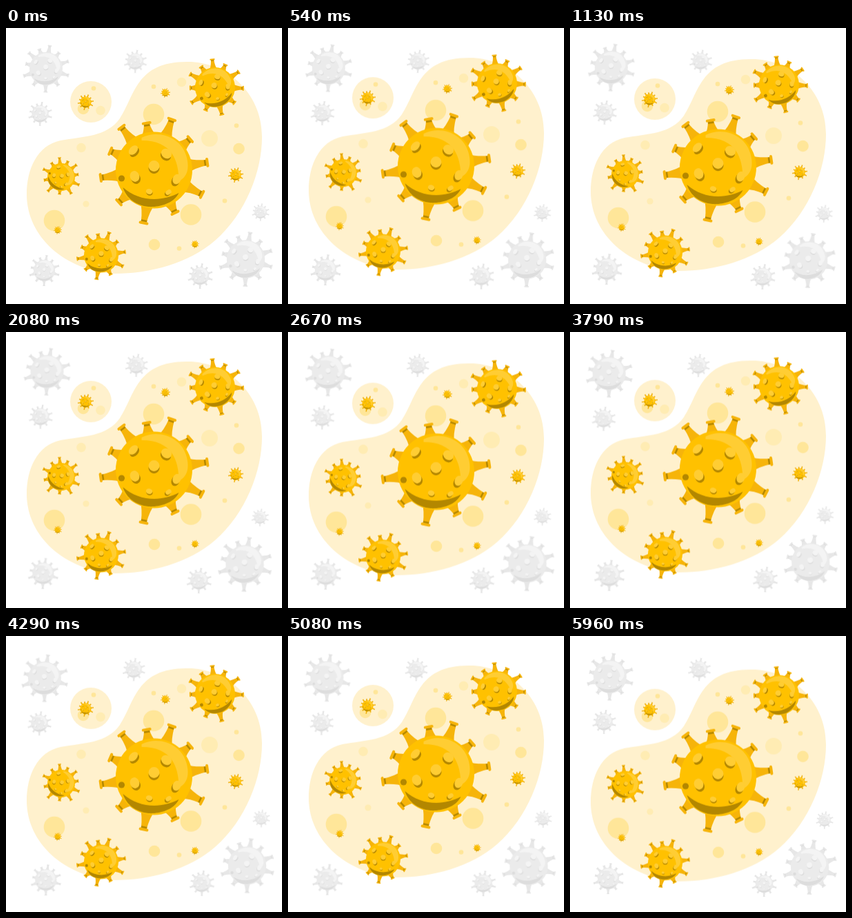
These frames come from a looping animation (400x400 px, 6 s). An HTML page:

```html
<!DOCTYPE html>
<html lang="en">
<head>
<meta charset="utf-8">
<title>Floating viruses</title>
<style>
  html, body { margin: 0; width: 100%; height: 100%; overflow: hidden; background: #fff; }
  svg { display: block; width: 100vw; height: 100vh; }
  #drift { transform-origin: 200px 200px; --body: #ebebeb; --spike: #e7e7e7; --dark: #dddddd; --light: #f4f4f4; }
  #float { --body: #ffc100; --spike: #f6b40a; --dark: #b38700; --light: #ffcd33; }
  .body { fill: var(--body); }
  .spike { fill: var(--spike); }
  .dark { fill: var(--dark); }
  .light { fill: var(--light); }
  .pale { fill: #fff1cd; }
  .soft { fill: #ffecb3; }
  .warm { fill: #ffe699; }
</style>
</head>
<body>
<svg viewBox="0 0 400 400">
  <defs><g id="virus"></g></defs>
  <g id="drift"></g>
  <g id="float">
    <path class="pale" d="M262 49C315 48 371 90 371 158C371 207 348 269 303 308C265 341 208 356 158 356C85 352 30 302 30 241C30 205 45 170 79 163C112 157 146 158 165 131C187 98 188 49 262 49Z"/>
    <circle class="pale" cx="123" cy="107" r="30"/>
  </g>
</svg>
<script>
const NS = 'http://www.w3.org/2000/svg';
const get = id => document.getElementById(id);
const virus = get('virus'), float = get('float'), drift = get('drift');

function add(parent, tag, attrs) {
  const el = document.createElementNS(NS, tag);
  for (const key in attrs) el.setAttribute(key, attrs[key]);
  return parent.appendChild(el);
}

// The virus is drawn around 0,0 with this body radius
const R = 55.5;
const SPIKES = 11;

// Spikes alternate long and short, and crowd together on one side
function addSpike(i) {
  const wave = Math.cos((i - 3.6) * 2 * Math.PI / SPIKES);
  const angle = 229 + i * 360 / SPIKES - 8.3 * wave;
  const long = (i + (i > 4)) % 2 === 0;
  const len = long ? 80 : 71;
  const g = add(virus, 'g', { transform: `rotate(${angle})` });
  add(g, 'path', { class: 'spike', d: `M49-11Q58-5.5 ${len - 3}-4V4Q58 5.5 49 11Z` });
  add(g, 'rect', { class: 'dark', x: len - 6.5, y: -4.2, width: 3, height: 8.4 });
  add(g, 'rect', { class: 'spike', x: len - 4, y: -7, width: 4, height: 14, rx: 2 });
}

// Bumps flatten towards the rim, as on a sphere, and shrink near the bottom
function addBump([x, y]) {
  const r = 8 - Math.max(0, y - 10) / 6.5;
  const rx = r * Math.sqrt(1 - (x * x + y * y) / (R * R));
  const turn = Math.atan2(y, x) * 180 / Math.PI;
  const oval = (cls, cx, cy) =>
    add(virus, 'ellipse', { class: cls, rx, ry: r, transform: `translate(${cx} ${cy}) rotate(${turn})` });
  oval('dark', x - x * .06, y + r * .4);
  oval('light', x, y);
}

for (let i = 0; i < SPIKES; i++) addSpike(i);
add(virus, 'circle', { class: 'body', r: R });
add(virus, 'path', { class: 'light', d: 'M-18-47C8-60 40-46 47-20C52-2 48 10 36 16C36-14 26-43-18-43Z' });
add(virus, 'path', { class: 'dark', d: 'M-45 25C-22 46 12 46 36 33C28 50 4 54-8 53C-26 51-40 41-45 25Z' });
add(virus, 'circle', { class: 'dark', cx: -47, cy: 12, r: 4.6 });
[[-30, -29], [18, -24], [0, -6], [-28, 9], [33, 13], [-7, 31], [21, 32]].forEach(addBump);

function addSpots(cls, r, ...points) {
  for (const [cx, cy] of points) add(float, 'circle', { class: cls, cx, cy, r });
}

function addVirus(group, x, y, radius, turn = 0) {
  add(group, 'use', { href: '#virus', transform: `translate(${x} ${y}) rotate(${turn}) scale(${radius / R})` });
}

addSpots('warm', 15.3, [214, 125], [268, 270.5], [70, 279]);
addSpots('warm', 8.3, [215, 314], [337.5, 175], [112, 117]);
addSpots('soft', 12, [295, 160]);
addSpots('soft', 6.8, [254.5, 78.5], [109, 173.5], [137, 119.5]);
addSpots('soft', 4.6, [116, 255]);
addSpots('warm', 3.3, [214, 85], [317, 250.5], [334, 141.5], [251, 319.5], [127, 87.5]);

addVirus(float, 214.5, 206, R);
addVirus(float, 303, 86, 29, -25);
addVirus(float, 138, 329.5, 25);
addVirus(float, 80, 216, 20, 32);
addVirus(float, 115.5, 107.5, 8);
addVirus(float, 333, 213, 7.7);
addVirus(float, 231, 94, 4.9);
addVirus(float, 75, 293, 4.2);
addVirus(float, 274, 313.5, 4.1);

const addGrey = (x, y, radius) => addVirus(drift, x, y, radius, -10);
addGrey(58, 59, 24);
addGrey(49.5, 124.5, 12.2);
addGrey(187.5, 48.5, 11.6);
addGrey(369, 267, 8.9);
addGrey(347.5, 335, 27.7);
addGrey(55.5, 351.5, 15.6);
addGrey(281.5, 359.5, 12.8);

const lift = y => ({ transform: `translateY(${y}px)` });
const tilt = (deg, offset) => ({ transform: `rotate(${deg}deg)`, offset });

const loops = [
  float.animate([lift(0), lift(-8), lift(0)], { duration: 1500, iterations: Infinity }),
  drift.animate([tilt(0, 0), tilt(1, .25), tilt(-1, .75), tilt(0, 1)], { duration: 6000, iterations: Infinity })
];
for (const loop of loops) loop.startTime = document.timeline.currentTime;
</script>
</body>
</html>
```
